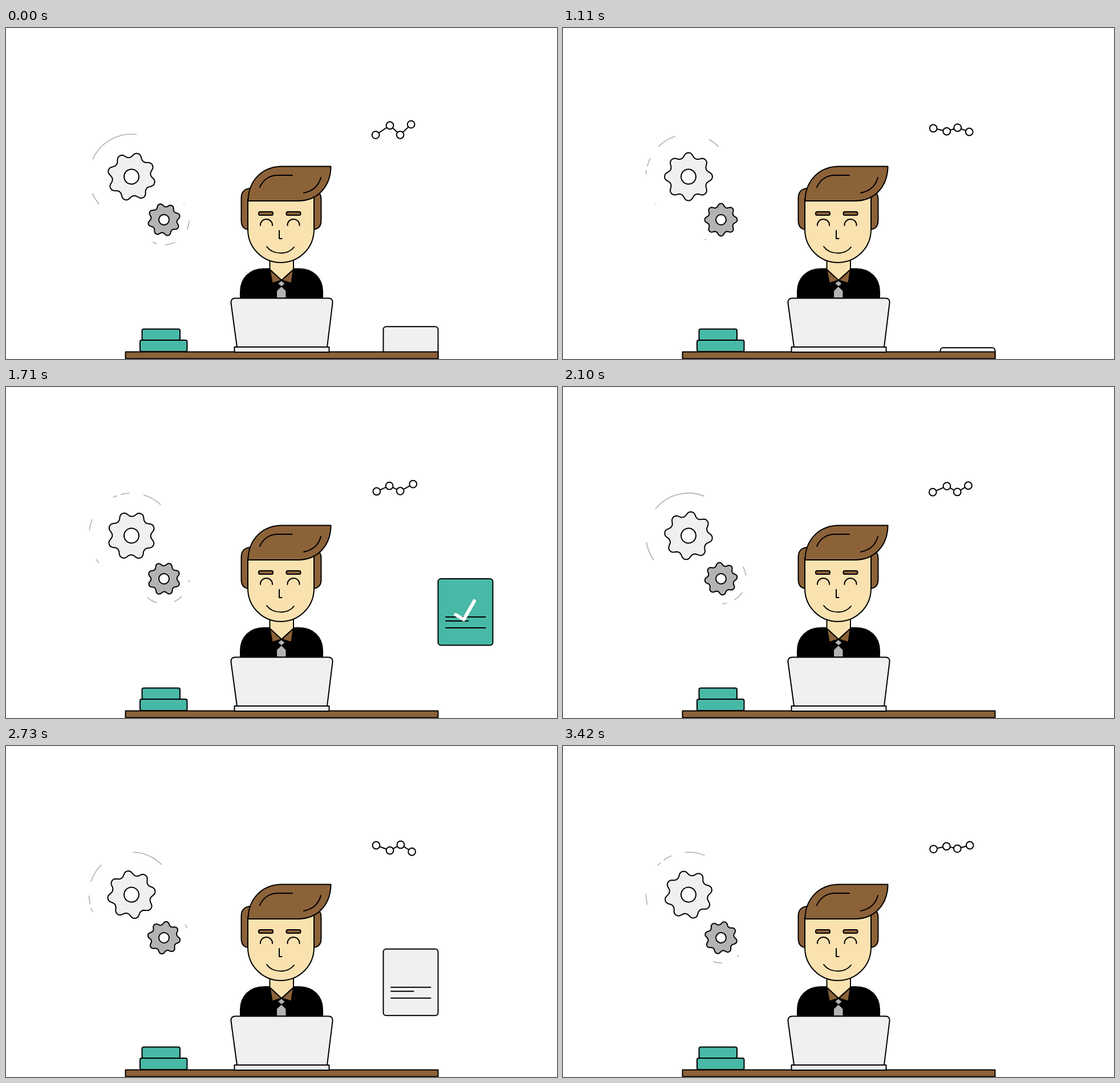
Write an HTML page that moves like this. It is 966 px wide and 580 px high and loops after 3.45 s.

```html
<!DOCTYPE html>
<html lang="en">
<head>
<meta charset="utf-8">
<title>Desk work</title>
<style>
  html, body { margin: 0; width: 100%; height: 100%; overflow: hidden; background: #fff; }
  svg { display: block; width: 966px; height: 580px; }
  .ink { stroke: #000; stroke-width: 2; stroke-linejoin: round; stroke-linecap: round; }
  .line { fill: none; }
  .brown { fill: #8c6239; }
  .teal { fill: #48b9a6; }
  .pale { fill: #f0f0f0; }
  .grey { fill: #b3b3b3; }
  .skin { fill: #f9e2b0; }
  .white { fill: #fff; }
  .trail { fill: none; stroke: #b0b0a8; stroke-width: 1.6; }
</style>
</head>
<body>
<svg viewBox="0 0 966 580">
  <path id="bigTrail" class="trail"/>
  <path id="smallTrail" class="trail"/>
  <g id="bigGear" class="ink"><path class="pale"/><circle class="white" r="13"/></g>
  <g id="smallGear" class="ink"><path class="grey"/><circle class="white" r="9"/></g>

  <g id="chart" class="ink"><polyline class="line"/></g>

  <g id="page" class="ink">
    <rect id="sheet" width="96" height="116.5" rx="5"/>
    <path class="line" d="M13.5 67H83M13.5 74H53M13.5 86H83"/>
    <path id="check" class="line" d="M31 63L45 71.5L63.5 39" stroke="#fff" stroke-width="6"/>
  </g>

  <g class="ink">
    <path class="brown" d="M430 281C418 281 412.5 288 412.5 298V337C412.5 347 417 352 424 353Z"/>
    <path class="brown" d="M540 353C548 352 552.5 347 552.5 337V300C552.5 293 550 289 546 287L536 290Z"/>
    <path d="M411 473V462C411 438 428 422 452 422H514C538 422 555 438 555 462V473Z"/>
    <path class="skin" d="M462.5 400H504V423L483 442L462.5 423Z"/>
    <path class="brown" stroke-width="1.4" d="M463 424L482.5 442L467 447ZM503.500 424L484 442L500 447Z"/>
    <path class="grey" stroke-width="1" d="M483 443L489 448L483 453L477 448ZM483 453L491 461V473H474.500V461Z"/>
    <path class="skin" d="M424 300V353A58 58 0 0 0 540 353V290Z"/>
    <path class="brown" d="M424.500 303C424.500 268 449 242.500 484 242.500H569.500C569.500 278 546 303 512 303Z"/>
    <path class="line" d="M445 279C451 265 463 258 477 258H502M552 262C548 277 537 286 522 289"/>
    <rect class="brown" x="443" y="322" width="25" height="6" rx="2.500"/>
    <rect class="brown" x="491.500" y="322" width="25" height="6" rx="2.500"/>
    <path class="line" d="M446 346V345A10.500 10 0 0 1 467 345V346M493.500 346V345A10.500 10 0 0 1 514.500 345V346"/>
    <path class="line" d="M479 355V369H483.500M457 383C468 398 494 398 505 384"/>
    <rect class="brown" x="209.500" y="567.500" width="548" height="12"/>
    <rect class="teal" x="238.500" y="527.500" width="66.500" height="19.500" rx="3"/>
    <rect class="teal" x="235" y="547" width="82.500" height="20" rx="3"/>
    <path class="pale" d="M402 473.500H565Q573.500 473.500 572.500 482L563 559H405L394.500 482Q394 473.500 402 473.500Z"/>
    <rect class="pale" x="400.500" y="559" width="166" height="9"/>
  </g>
</svg>
<script>
const LOOP = 3450, TURN = 1908, LEAD = 68;
const $ = id => document.getElementById(id);
const clamp = v => Math.max(0, Math.min(1, v));
const mix = (a, b, k) => a + (b - a) * k;
const ease = k => k < .5 ? 4 * k ** 3 : 1 - 4 * (1 - k) ** 3;

function gearPath(mid, amp) {
  const pts = [];
  for (let i = 0; i < 160; i++) {
    const a = i / 160 * 2 * Math.PI;
    const r = mid + amp * Math.sin(1.2 * Math.cos(8 * a)) / Math.sin(1.2);
    pts.push((r * Math.sin(a)).toFixed(2) + ' ' + (-r * Math.cos(a)).toFixed(2));
  }
  return 'M' + pts.join('L') + 'Z';
}
$('bigGear').firstChild.setAttribute('d', gearPath(37.8, 4.1));
$('smallGear').firstChild.setAttribute('d', gearPath(25.6, 2.8));

// Angles in degrees, clockwise from the top
function polar(cx, cy, r, deg) {
  const a = deg * Math.PI / 180;
  return (cx + r * Math.sin(a)).toFixed(2) + ' ' + (cy - r * Math.cos(a)).toFixed(2);
}

function arcs(t, turn) {
  let d = '';
  for (const [from, to] of t.dashes)
    for (const wrap of [-360, 0, 360]) {
      const a = Math.max(from + turn + wrap, t.min);
      const b = Math.min(to + turn + wrap, t.max);
      if (b > a)
        d += `M${polar(t.x, t.y, t.r, a)}A${t.r} ${t.r} 0 0 1 ${polar(t.x, t.y, t.r, b)}`;
    }
  return d;
}

const bigTrail = {
  x: 220, y: 260.5, r: 74.5, min: -130, max: 45,
  dashes: [[-66, 7], [-140, -113], [-171, -159], [-182, -176], [-239, -224], [-290, -280]]
};
const smallTrail = {
  x: 277, y: 336, r: 44, min: 52, max: 222,
  dashes: [[50, 54], [92, 113], [153, 178], [197, 207]]
};

// Chart poses: start, middle, end
const poses = [
  [[648, 188.5], [673, 169.7], [691, 188.5], [710, 167.5]],
  [[649, 173], [673, 184], [692, 171.8], [711.7, 186.5]],
  [[650, 184.5], [672, 171.5], [691, 184], [714, 167.5]]
];
const chart = $('chart'), chartLine = chart.firstChild;
const dots = poses[0].map(() => {
  const c = document.createElementNS('http://www.w3.org/2000/svg', 'circle');
  c.setAttribute('r', 6.4);
  c.setAttribute('class', 'white');
  return chart.appendChild(c);
});

function drawChart(k) {
  const i = k < .5 ? 0 : 1, part = k * 2 - i;
  const pts = poses[i].map((p, n) => p.map((v, j) => mix(v, poses[i + 1][n][j], part)));
  chartLine.setAttribute('points', pts.join(' '));
  dots.forEach((c, n) => {
    c.setAttribute('cx', pts[n][0]);
    c.setAttribute('cy', pts[n][1]);
  });
}

// Two pages are approved, the third sinks back behind the desk
const pages = [
  { start: -50, ok: true },
  { start: 1103, ok: true },
  { start: 2258, ok: false }
];
const pale = [240, 240, 240], teal = [72, 185, 166];

function drawPage(t) {
  const page = pages.filter(p => t >= p.start).pop();
  const age = t - page.start;
  const up = clamp(age / 270);
  const aside = page.ok ? ease(clamp((age - 455) / 135)) : 0;
  const exit = page.ok ? clamp((age - 760) / 200) ** 2 : 0;
  const down = page.ok ? 0 : clamp((age - 450) / 270);
  const x = 661.5 + 96 * aside + 225 * exit;
  const y = 567 - 231 * (up - down);
  $('page').setAttribute('transform', `translate(${x} ${y})`);
  $('page').style.display = exit === 1 || down === 1 ? 'none' : '';
  $('sheet').style.fill = `rgb(${pale.map((v, i) => Math.round(mix(v, teal[i], aside)))})`;
  $('check').style.cssText =
    `stroke:#fff;stroke-width:6;opacity:${page.ok ? clamp((age - 515) / 82) : 0}`;
}

function draw(t) {
  const spin = 15.4 + 360 * t / TURN;
  $('bigGear').setAttribute('transform', `translate(220 260.5) rotate(${spin})`);
  $('smallGear').setAttribute('transform', `translate(277 336) rotate(${-spin})`);

  const u = (t + LEAD) % TURN, s = u - LEAD;
  $('bigTrail').setAttribute('d', arcs(bigTrail, .074 * s + 1.02e-5 * s * s));
  $('smallTrail').setAttribute('d', arcs(smallTrail, -.155 * s - 1.75e-5 * s * s));
  drawChart(u / TURN);
  drawPage(t);
}

const begin = performance.now();
function tick() {
  draw((performance.now() - begin) % LOOP);
  requestAnimationFrame(tick);
}
tick();
</script>
</body>
</html>
```
